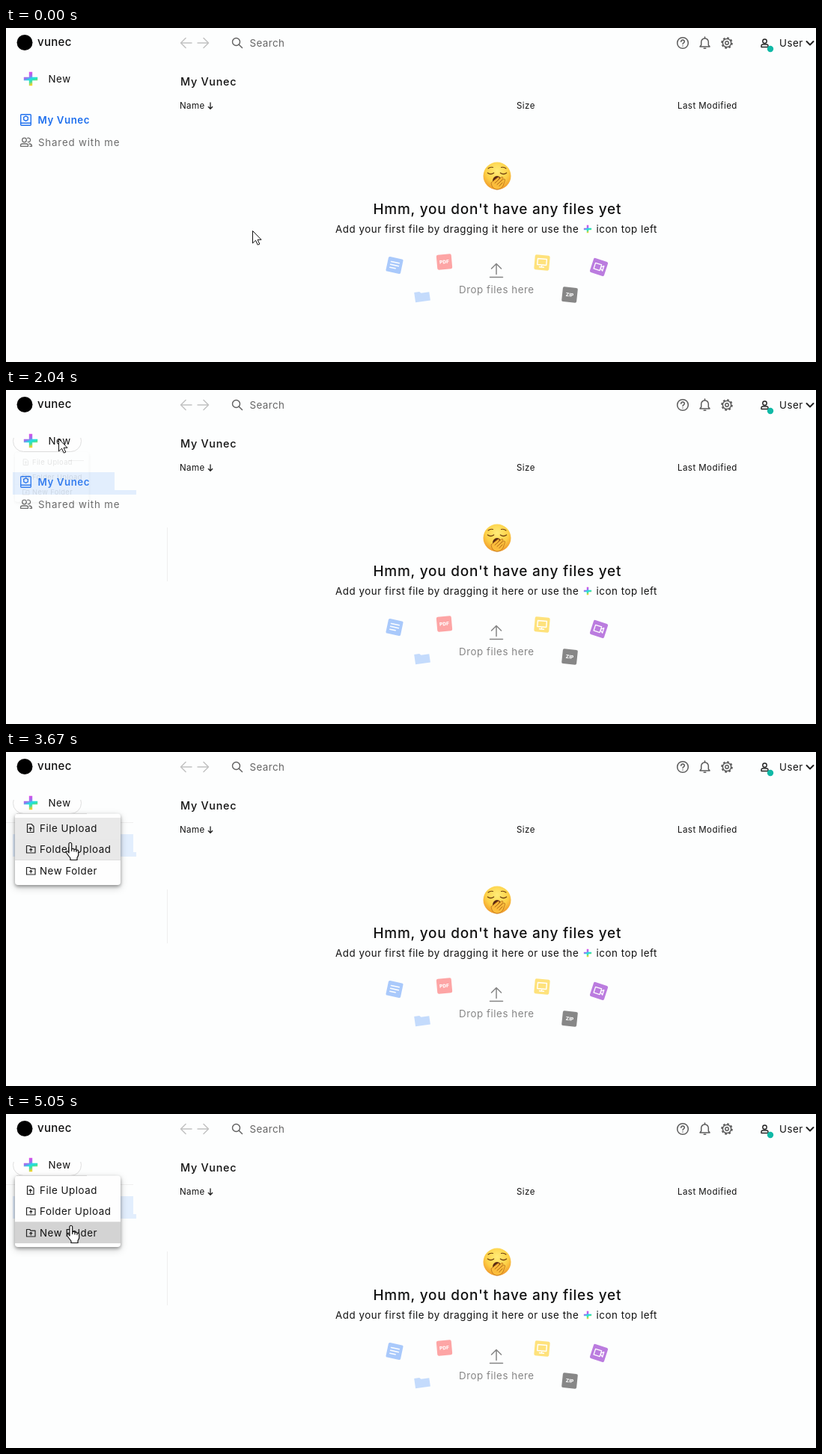
Recreate the animation shown at these times as an HTML page. Size 1082x447 px, loop 6110 ms.

```html
<!DOCTYPE html>
<html lang="en">
<head>
<meta charset="utf-8">
<title>File manager</title>
<style>
  html, body { margin: 0; width: 100%; height: 100%; overflow: hidden; background: #fdfefe; }
  svg { display: block; }
  text { font: 13.3px Inter, "Open Sans", sans-serif; letter-spacing: .56px; fill: #111; }
  .small { font-size: 11.5px; letter-spacing: .45px; }
  .title { font-size: 14.3px; font-weight: 500; letter-spacing: .75px; }
  .brand { font-size: 15px; font-weight: 500; letter-spacing: .3px; }
  .hero { font-size: 19px; font-weight: 500; letter-spacing: .74px; text-anchor: middle; }
  .badge { font-size: 6.5px; font-weight: 800; letter-spacing: 0; fill: #fff; text-anchor: middle; }
  .active { font-weight: 600; fill: #1f70ee; }
  .shared { letter-spacing: .82px; fill: #6c6c6c; }
  .search { letter-spacing: .45px; fill: #666; }
  .hint { fill: #868686; }
  .line { fill: none; stroke-linecap: round; stroke-linejoin: round; }
  .paper { filter: drop-shadow(0 2px 2px #0005) drop-shadow(0 3px 5px #0003); }
  #menu { transform-origin: 12px 84px; }
</style>
</head>
<body>
<svg width="1082" height="447" viewBox="0 0 1082 447">
  <defs>
    <linearGradient id="rainbow" x1=".25" y1="0" x2=".7" y2="1">
      <stop offset=".08" stop-color="#e04be8"/>
      <stop offset=".34" stop-color="#9b72ee"/>
      <stop offset=".52" stop-color="#1fdfe6"/>
      <stop offset=".68" stop-color="#3be3a4"/>
      <stop offset=".9" stop-color="#f5d32c"/>
    </linearGradient>
    <radialGradient id="skin" cx=".5" cy=".32" r=".68">
      <stop offset="0" stop-color="#ffec78"/>
      <stop offset=".6" stop-color="#fdd046"/>
      <stop offset="1" stop-color="#f0982a"/>
    </radialGradient>
    <clipPath id="below"><path d="M0 64H180V100H0z"/></clipPath>
    <path id="plus" d="M-2.2-9.2h4.400v7h7v4.400h-7v7h-4.400v-7h-7v-4.400h7z" fill="url(#rainbow)"/>
    <path id="folderUp" class="line" stroke="#222" stroke-width="1.2" d="M0 0H4.200L5.600 1.600H11.500V9.500H0zM5.800 7.500V4M4.200 5.400L5.800 3.800 7.400 5.400"/>
  </defs>

  <!-- top bar -->
  <circle cx="25" cy="19.5" r="10.5"/>
  <text class="brand" x="42" y="24">vunec</text>
  <path class="line" stroke="#c2c2c2" stroke-width="1.5" d="M248 20H233.5M240 13.5L233.5 20 240 26.5M256 20H270.5M264 13.5L270.5 20 264 26.5"/>
  <g class="line" stroke="#606060" stroke-width="1.4">
    <circle cx="307.5" cy="18.5" r="5"/>
    <path d="M311.2 22.2L315.5 26.5"/>
  </g>
  <text class="search" x="325.5" y="25">Search</text>
  <g class="line" stroke="#5c5c5c" stroke-width="1.5">
    <circle cx="904" cy="20" r="7.3"/>
    <path d="M901.7 18.3Q901.9 16 904 16T906.3 18.2C906.3 19.8 904 19.900 904 21.600M904 24v.1"/>
    <path d="M927 25H940L938.3 22.7V18.5Q938 14.5 933.5 13.700Q929 14.500 928.700 18.500V22.700ZM933.500 13.700V12M932.200 27.300H934.800"/>
    <g transform="translate(963 20)" stroke-linecap="butt">
      <circle r="5.6"/>
      <circle r="6.9" stroke-width="1.8" stroke-dasharray="2.7 2.719"/>
      <circle r="2.2"/>
    </g>
  </g>
  <g class="line" stroke="#222" stroke-width="1.4">
    <circle cx="1013.5" cy="17.7" r="2.7"/>
    <path d="M1009 25.5V24Q1009 22 1011 22H1016Q1018 22 1018 24V25.5Z"/>
    <path d="M1069.5 18L1074 22.5 1078.5 18" stroke-width="2"/>
  </g>
  <circle cx="1021" cy="28" r="4.2" fill="#10b9a6"/>
  <text x="1033" y="25">User</text>

  <!-- sidebar -->
  <g fill="#e2eefd">
    <path data-on="640" d="M93 110H144V134H174V140H93z"/>
    <path data-on="900" d="M82 110H94V115H82z"/>
    <path data-on="2040" d="M9 110H145V140H9z"/>
    <path data-on="2130" d="M144 110H170V140H144z"/>
  </g>
  <g fill="none" stroke="#efefef">
    <path data-on="460" d="M215.5 184V256"/>
    <path data-on="900" d="M83 94.5H104"/>
    <path data-on="2130" d="M0 94.5H170"/>
  </g>
  <g data-on="2040" clip-path="url(#below)">
    <rect x="9.5" y="54" width="91" height="28.5" rx="14" fill="#fefefe" stroke="#dedede"/>
  </g>
  <use href="#plus" x="33" y="68"/>
  <text x="56.5" y="73">New</text>
  <g class="line" stroke="#1f70ee" stroke-width="1.4">
    <rect x="19.7" y="115.7" width="13.6" height="14.6" rx="1"/>
    <path d="M20 127.3H33M26.5 117.9L29.3 119.4V122.8L26.5 124.4 23.7 122.8V119.4Z"/>
  </g>
  <text class="active" x="42.5" y="128">My Vunec</text>
  <g class="line" stroke="#6c6c6c" stroke-width="1.3">
    <circle cx="24.5" cy="150" r="2.8"/>
    <path d="M19.5 158.3V157Q19.5 155 22 155H27Q29.5 155 29.5 157V158.3ZM28.8 147.4A2.7 2.7 0 1 1 29.3 152.5M31 155Q34.5 155 34.5 158.3H32"/>
  </g>
  <text class="shared" x="43" y="158">Shared with me</text>

  <!-- file area -->
  <text class="title" x="233" y="77">My Vunec</text>
  <text class="small" x="232" y="108">Name</text>
  <path class="line" d="M273 100V108M270.3 105.5L273 108.2 275.7 105.5" stroke="#222" stroke-width="1.3"/>
  <text class="small" x="682" y="108">Size</text>
  <text class="small" x="897" y="108">Last Modified</text>

  <g transform="translate(656 198)">
    <circle r="18.5" fill="url(#skin)"/>
    <ellipse cx="0" cy="6.500" rx="6" ry="6.500" fill="#5a2a12"/>
    <g class="line" stroke="#70400f" stroke-width="1.5">
      <path d="M-12.500-4Q-8.500-1-4.500-4M4.500-4Q8.500-1 12.500-4"/>
      <path d="M-12-10Q-9-12.500-5.500-11.500M5.500-11.500Q9-12.500 12-10" stroke-width="1.1"/>
    </g>
    <path d="M-8 9L1 2Q3 1 3 3L1 6 6 1.500Q8 1 8 3L5 7 9 4Q11 4 10.500 6L8 13Q5 18.500-1 18Q-7 17-8 9Z" fill="#fbbd3b" stroke="#b9701c" stroke-width=".8"/>
    <path class="line" d="M-3 9.500L1 6M0 11.500L5 7M3 13.500L7 9" stroke="#a65a12" stroke-width=".9"/>
  </g>
  <text class="hero" x="656.3" y="249">Hmm, you don't have any files yet</text>
  <text x="440" y="274">Add your first file by dragging it here or use the</text>
  <use href="#plus" transform="translate(777 269) scale(.56)"/>
  <text x="788.5" y="274">icon top left</text>

  <g transform="translate(519 317.5) rotate(12)">
    <rect x="-10" y="-10" width="20" height="20" rx="2" fill="#a9c9fb"/>
    <path class="line" d="M-5.5-4H5.5M-5.5 0H5.5M-5.5 4H2" stroke="#fff" stroke-width="1.5"/>
  </g>
  <g transform="translate(585.5 313) rotate(-5)">
    <rect x="-10" y="-10" width="20" height="20" rx="2" fill="#fda5a5"/>
    <text class="badge" y="2.3">PDF</text>
  </g>
  <g transform="translate(716 314) rotate(5)">
    <rect x="-10" y="-10" width="20" height="20" rx="2" fill="#fee27c"/>
    <path class="line" d="M-6-5H6V3H-6ZM0 3V6M-3 6H3" stroke="#fff" stroke-width="1.4"/>
  </g>
  <g transform="translate(792 320) rotate(18)">
    <rect x="-10" y="-10" width="20" height="20" rx="2" fill="#bb7cdf"/>
    <path class="line" d="M-6-4H2.5V4H-6ZM2.5-.7L6-3.5V3.5L2.5 .7" stroke="#fff" stroke-width="1.3"/>
  </g>
  <path transform="translate(556 359) rotate(-8)" d="M-10-6.5H-3L-1-4.5H10V7H-10Z" fill="#c4dbfc"/>
  <g transform="translate(753 357) rotate(6)">
    <rect x="-10" y="-10" width="20" height="20" rx="2" fill="#878787"/>
    <text class="badge" y="2.3">ZIP</text>
  </g>
  <path class="line" d="M655 329.5V315.5M648.5 322L655 315.5 661.5 322M646.5 333.5H663.5" stroke="#858585" stroke-width="1.5"/>
  <text class="hint" x="605" y="355">Drop files here</text>

  <!-- drop-down -->
  <g id="menu">
    <rect class="paper" x="12" y="82.5" width="141" height="95.5" rx="4" fill="#fefefe"/>
    <path d="M14 82.5H108" stroke="#d4d4d4"/>
    <path data-on="2890 3760" d="M12 88H153V116H12z" fill="#e9e9e9"/>
    <path data-on="3520 4630" d="M12 116H153V144H12z" fill="#e8e8e8"/>
    <path data-on="4630" d="M12 145H153V173H12z" fill="#d3d3d3"/>
    <path d="M12 144.5H153" stroke="#dedede"/>
    <path class="line" d="M28.5 96.5H34L37 99.5V107.5H28.5ZM32.7 105.5V101M31 102.6L32.7 100.9 34.4 102.6" stroke="#222" stroke-width="1.2"/>
    <use href="#folderUp" x="27.5" y="125.5"/>
    <use href="#folderUp" x="27.5" y="154.5"/>
    <text x="45" y="107">File Upload</text>
    <text x="45" y="135">Folder Upload</text>
    <text x="45" y="164">New Folder</text>
  </g>

  <g id="cursor" fill="#fff" stroke="#111" stroke-linejoin="round">
    <path id="arrow" d="M-.5.5V17L3.5 13.2 6.2 19.2 8.8 18.1 6.1 12.3H11Z"/>
    <path id="hand" stroke-width="1.2" d="M-2 14V1.5Q0-1 1.7 1.5V9Q4 7.5 5 9.5Q7 8.5 8 10.5Q10.5 9.5 10.7 12V17Q10 19 9 20.5V23.5H0V21L-5 14.5Q-6.5 11-3.5 12ZM1.7 9V12M5 9.5V12.5M8 10.5V13"/>
  </g>
</svg>
<script>
  const LOOP = 6110;
  const byId = id => document.getElementById(id);
  const [menu, cursor, arrow, hand] = ["menu", "cursor", "arrow", "hand"].map(byId);

  // Pointer tip: start time, x, y
  const moves = [
    [0, 330, 271], [280, 322, 265], [370, 292, 243], [460, 248, 211], [550, 203, 178],
    [640, 160, 146], [720, 122, 118], [810, 93, 96], [900, 82, 81], [970, 73, 70],
    [1050, 71, 65], [2470, 71, 68], [2650, 71, 75], [2740, 71, 83], [2810, 72, 89],
    [2890, 73, 94], [3070, 73, 95], [3440, 77, 102], [3520, 81, 110], [3600, 84, 117],
    [3670, 86, 121], [3760, 86, 123], [4040, 85, 126], [4100, 85, 129], [4280, 86, 136],
    [4370, 87, 144], [4630, 87, 146], [4700, 86, 147], [4870, 87, 148], [5050, 87, 149]
  ];
  const handSpans = [[1230, 2040], [2890, 4370], [4630, LOOP]];
  // Menu opening: start time, opacity, scale
  const opening = [[0, 0, .7], [2040, .1, .7], [2130, .65, .92], [2220, 1, 1]];

  const timed = [...document.querySelectorAll("[data-on]")].map(el => {
    const [from, to = LOOP] = el.dataset.on.split(" ").map(Number);
    return { el, from, to };
  });

  const current = (steps, t) => steps.findLast(step => step[0] <= t);
  const show = (el, on) => { el.style.display = on ? "" : "none"; };

  function draw(now) {
    const t = now % LOOP;
    const [, x, y] = current(moves, t);
    const [, opacity, scale] = current(opening, t);
    const pointing = handSpans.some(([from, to]) => t >= from && t < to);

    cursor.setAttribute("transform", `translate(${x} ${y})`);
    show(hand, pointing);
    show(arrow, !pointing);
    show(menu, opacity > 0);
    menu.style.opacity = opacity;
    menu.style.transform = `scale(${scale})`;
    for (const { el, from, to } of timed) show(el, t >= from && t < to);
  }

  const start = performance.now();
  function tick() {
    draw(performance.now() - start);
    requestAnimationFrame(tick);
  }
  tick();
</script>
</body>
</html>
```
